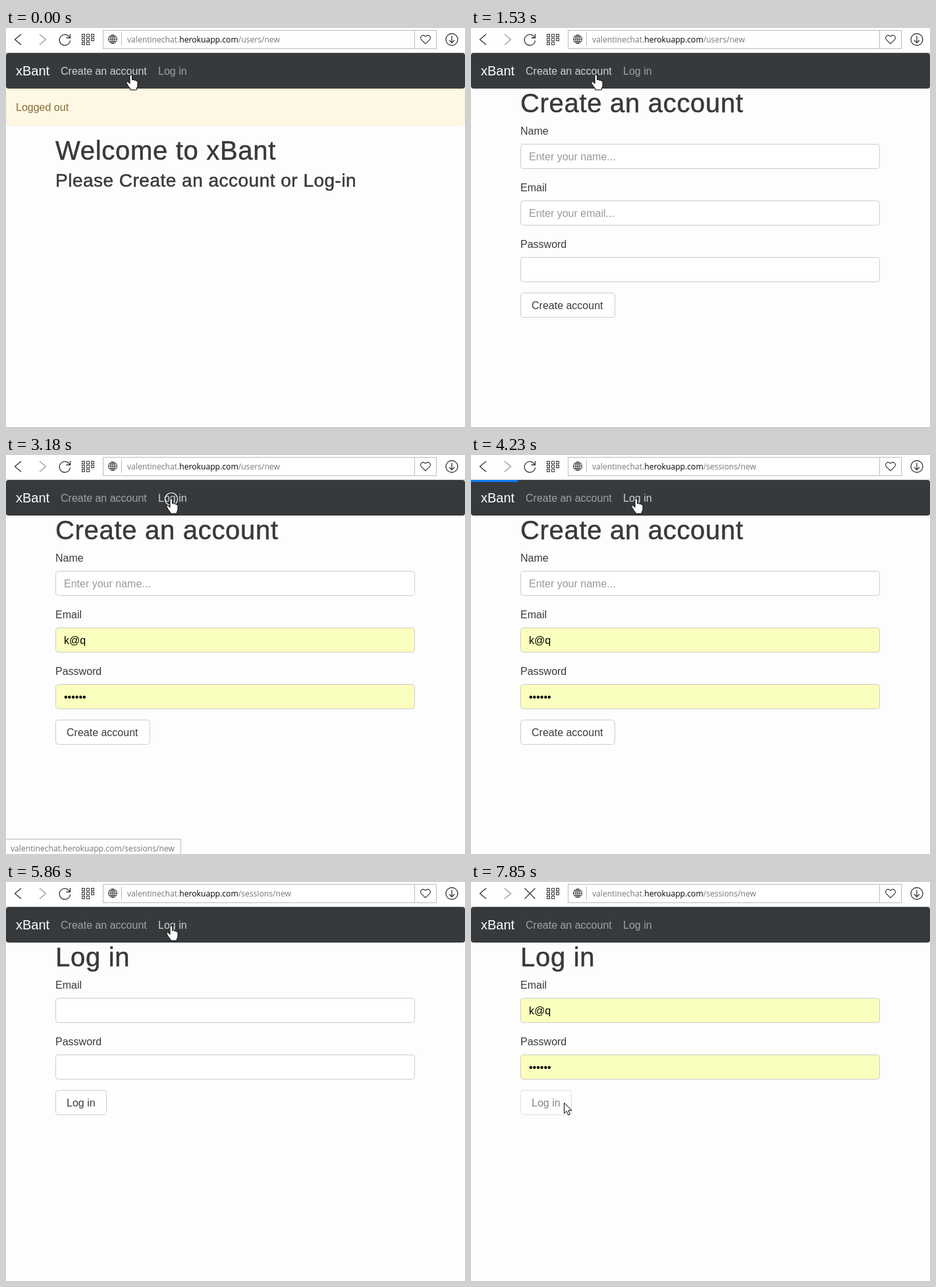
Write an HTML page that moves like this. It is 697x606 px and loops after 8000 ms.

```html
<!DOCTYPE html>
<html lang="en">
<head>
<meta charset="utf-8">
<title>Chat sign-in</title>
<style>
html, body { margin: 0; width: 100%; height: 100%; overflow: hidden; background: #fdfdfd; }
svg { display: block; font: 16px "Liberation Sans", Arial, sans-serif; fill: #373a3c; }
.url { font: 12.15px "Open Sans", "Noto Sans", sans-serif; fill: #777; }
.url .host { fill: #000; }
.icon { fill: none; stroke: #333; stroke-width: 1.3; }
.title { font-size: 40px; }
.sub { font-size: 28px; }
.title, .sub { letter-spacing: .0175em; stroke: #373a3c; stroke-width: .5px; }
.link { fill: #fff; fill-opacity: .5; stroke: #fff; stroke-opacity: .1; stroke-width: .3px; }
.link.hover { fill-opacity: .75; }
.box { fill: #fff; stroke: #ccc; }
.hint { fill: #999; }
.value { fill: #000; visibility: hidden; }
.filled .auto .box { fill: #faffbd; }
.filled .auto .hint { visibility: hidden; }
.filled .auto .value { visibility: inherit; }
.cursor path { fill: #fff; stroke: #000; stroke-linejoin: round; }
</style>
</head>
<body>
<svg id="stage" width="697" height="606" viewBox="0 0 697 606">
  <rect width="697" height="606" fill="#fdfdfd"/>
  <rect width="697" height="37" fill="#fff"/>
  <path d="M0 37.5H697" stroke="#ccc"/>

  <g class="icon">
    <path d="M23 9.5L13.5 17.5L23 25.5"/>
    <path d="M51 9.5L60.5 17.5L51 25.5" stroke="#999"/>
    <path id="reload" d="M96.7 14.5A8.2 8.2 0 1 0 97.5 19M97.5 9V15H91.5"/>
    <path id="stop" d="M81.5 9.5L97.5 25.5M97.5 9.5L81.5 25.5"/>
    <g id="tiles" stroke-width="1"></g>
    <g stroke="#bbb" stroke-width="1">
      <rect x="147.5" y="3.5" width="506" height="28" fill="#fff"/>
      <path d="M175.5 7V27M620.5 3V31"/>
    </g>
    <g stroke-width="1">
      <circle cx="162" cy="17" r="6.5"/>
      <ellipse cx="162" cy="17" rx="3" ry="6.5"/>
      <path d="M155.5 17H168.5M162 10.5V23.5M156.5 13.7H167.5M156.5 20.3H167.5"/>
    </g>
    <path d="M637 24L630.8 17.8C627.5 14 632.5 8 637 13C641.5 8 646.5 14 643.2 17.8Z" stroke-width="1.1"/>
    <circle cx="677" cy="17.5" r="9"/>
    <path d="M677 12V22.5M673 18.5L677 22.5L681 18.5"/>
  </g>
  <text class="url" x="184" y="22">valentinechat.<tspan class="host">herokuapp.com</tspan><tspan id="path"></tspan></text>

  <g id="pages"></g>

  <rect y="38" width="697" height="54" rx="4" fill="#373a3c"/>
  <text x="15" y="72" font-size="20" fill="#fff">xBant</text>
  <text class="link" id="join" x="83" y="71">Create an account</text>
  <text class="link" id="login" x="231" y="71">Log in</text>
  <rect id="bar" y="38" height="3" fill="#0878f9"/>

  <g id="status">
    <rect x="-.5" y="583.5" width="266" height="24" fill="#fdfdfd" stroke="#bbb"/>
    <text class="url" x="7" y="602">valentinechat.herokuapp.com/sessions/new</text>
  </g>

  <circle id="ring" fill="none" stroke-width="1.2"/>
  <g class="cursor" id="cursor">
    <path id="hand" d="M-2 1.8a1.8 1.8 0 0 1 3.6 0V8c1-1 3-.7 3.4.6 1-.8 2.6-.3 2.8 1 1.2-.5 2.2.3 2.2 1.6V16c0 2-1 3-1.6 5v2H-1.5v-2c-2-2.5-4.5-6-5.5-8.5-.5-1.8 1.5-2.6 2.8-1.2L-2 13.5z"/>
    <path id="arrow" d="M.5 .5V16.5L4.2 13L6.8 19L9.4 17.8L6.8 12H12Z"/>
    <path id="beam" d="M-3 -8H3M0 -8V8M-3 8H3"/>
  </g>
</svg>
<script>
const $ = id => document.getElementById(id);
const show = (id, on) => $(id).style.visibility = on ? 'inherit' : 'hidden';

const text = (s, x, y, cls = '') => `<text class="${cls}" x="${x}" y="${y}">${s}</text>`;
const box = (y, w, h = 37) => `<rect class="box" x="75.5" y="${y + .5}" width="${w}" height="${h}" rx="4"/>`;
const field = (label, y, hint = '', value = '') =>
  `<g class="${value && 'auto'}">${text(label, 75, y - 14)}${box(y, 545)}` +
  `${text(hint, 88, y + 25, 'hint')}${text(value, 88, y + 25, 'value')}</g>`;
const button = (label, y, w, id) => `<g id="${id}">${box(y, w)}${text(label, 92, y + 25)}</g>`;

const email = 'k@q', dots = '••••••';
const pages = [
  '<rect x=".5" y="92.5" width="696" height="55" rx="4" fill="#fdf7e3" stroke="#faf2cc"/>' +
    '<text x="15" y="126" style="fill:#8a6d3b">Logged out</text>' +
    text('Welcome to xBant', 75, 200, 'title') +
    text('Please Create an account or Log-in', 75, 241, 'sub'),
  text('Create an account', 75, 128, 'title') +
    field('Name', 176, 'Enter your name...') +
    field('Email', 262, 'Enter your email...', email) +
    field('Password', 348, '', dots) +
    button('Create account', 402, 143, 'create'),
  text('Log in', 75, 128, 'title') +
    field('Email', 176, '', email) +
    field('Password', 262, '', dots) +
    button('Log in', 316, 77, 'submit')
];
$('pages').innerHTML = pages.map((p, i) => `<g id="page${i}">${p}</g>`).join('');
$('tiles').innerHTML = Array.from({ length: 8 }, (_, i) =>
  `<rect x="${115.5 + i % 3 * 7}" y="${9.5 + Math.floor(i / 3) * 6}" width="4" height="4"/>`).join('');

// Each row: start time, then the values held from there on.
const held = (rows, t) => rows.findLast(r => t >= r[0]).slice(1);
const BAR = [
  [0, 0], [140, 69], [550, 70], [820, 72], [960, 75], [1100, 79], [1240, 85], [1390, 653], [1530, 0],
  [3820, 69], [4090, 70], [4220, 71], [4340, 72], [4470, 74],
  [4750, 76], [4890, 78], [5030, 80], [5170, 82], [5310, 84], [5470, 86], [5590, 90], [5720, 653], [5860, 0]
];
const POINTER = [[0, 190, 71], [2350, 208, 70], [2480, 238, 68], [2620, 251, 66]];
const RING = [[0, 0], [3180, 9.5], [3300, 12], [3420, 0], [7706, 9.5], [7850, 0]];

function pointer(t) {
  if (t < 7130) return held(POINTER, t);
  // Swing out to the right and back to the button, in five jumps.
  const u = Math.min(1, (Math.floor((t - 7130) / 144) + 1) / 5), v = 1 - u;
  const curve = (a, b, c) => v * v * a + 2 * u * v * b + u * u * c;
  return [curve(251, 469, 141), curve(66, 190, 335)];
}

function draw(t) {
  const page = t < 1390 ? 0 : t < 5720 ? 1 : 2;
  pages.forEach((_, i) => show('page' + i, i === page));
  $('stage').classList.toggle('filled', t >= 2210 && t < 5720 || t >= 6550);
  $('path').textContent = t < 3300 ? '/users/new' : '/sessions/new';
  $('bar').setAttribute('width', held(BAR, t)[0]);
  show('status', t >= 2620 && t < 3300);
  show('reload', t < 7850);
  show('stop', t >= 7850);
  $('submit').style.opacity = t < 7850 ? 1 : .6;

  const [x, y] = pointer(t);
  const onJoin = y < 92 && x > 83 && x < 216;
  const onLogin = y < 92 && x > 231 && x < 276;
  const onField = y > 176 && y < 214 || y > 262 && y < 300;
  $('join').classList.toggle('hover', onJoin);
  $('login').classList.toggle('hover', onLogin);
  const kind = onJoin || onLogin ? 'hand' : onField ? 'beam' : 'arrow';
  for (const id of ['hand', 'beam', 'arrow']) show(id, id === kind);
  $('cursor').setAttribute('transform', `translate(${x} ${y})`);

  const ring = $('ring');
  ring.setAttribute('cx', x);
  ring.setAttribute('cy', y + 1);
  ring.setAttribute('r', held(RING, t)[0]);
  ring.setAttribute('stroke', y < 92 ? '#fff' : '#777');
}

const start = performance.now();
(function tick() {
  draw((performance.now() - start) % 8000);
  requestAnimationFrame(tick);
})();
</script>
</body>
</html>
```
